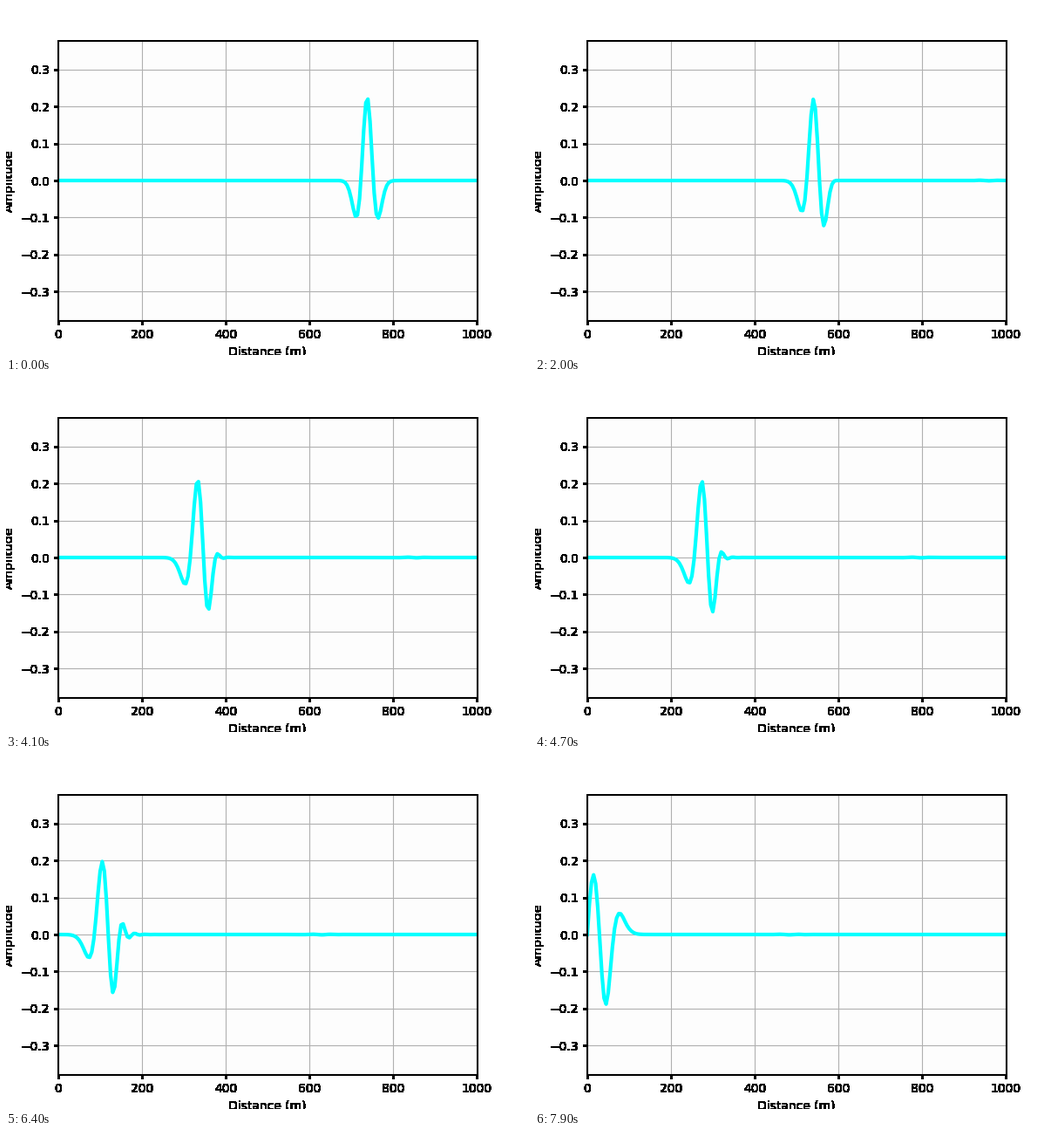
Write a matplotlib script that moves like this. It is 600 px wide and 400 px high and loops after 8000 ms.

```python
import numpy as np
import matplotlib.pyplot as plt
from matplotlib.animation import FuncAnimation

FRAMES, INTERVAL = 80, 100
DX = 5.0
STEPS = 3                 # time steps per frame
COURANT = 2 / 3           # 10 m of travel per frame
AMP, WIDTH, START = 0.2235, 21.2, 748.0

x = np.arange(0, 1000 + DX, DX)


def ricker(center):
    a2 = ((x - center) / WIDTH) ** 2
    return AMP * (1 - 2 * a2) * np.exp(-a2)


def simulate():
    """Second-order wave equation, pulse sent left, fixed ends."""
    prev, now = ricker(START + COURANT * DX), ricker(START)
    states = []
    for _ in range(FRAMES):
        for _ in range(STEPS):
            new = np.zeros_like(now)
            bend = now[2:] - 2 * now[1:-1] + now[:-2]
            new[1:-1] = 2 * now[1:-1] - prev[1:-1] + COURANT**2 * bend
            prev, now = now, new
        states.append(now)
    return states


def harden_edges(fig):
    """Turn the soft edges of text, ticks and frame solid black."""
    fig.patch.set_alpha(0)
    fig.canvas.draw()
    alpha = np.array(fig.canvas.buffer_rgba())[..., 3]
    ink = np.zeros(alpha.shape + (4,))
    ink[..., 3] = (alpha > 0) & (alpha < 255)
    fig.patch.set_alpha(1)
    fig.figimage(ink, origin="upper", zorder=5)


fig = plt.figure(figsize=(6, 4), dpi=100, facecolor="white")
ax = fig.add_axes([0.1, 0.1, 0.8, 0.8], facecolor="#fdfdfd")
ax.set(xlim=(0, 1000), ylim=(-0.377, 0.377),
       xlabel="Distance (m)", ylabel="Amplitude")
ax.grid(True)
harden_edges(fig)

waves = simulate()
line, = ax.plot(x, waves[0], color="cyan", lw=3)


def update(i):
    line.set_ydata(waves[i])
    return line,


anim = FuncAnimation(fig, update, frames=FRAMES, interval=INTERVAL,
                     repeat=True, repeat_delay=0)
plt.show()
```
